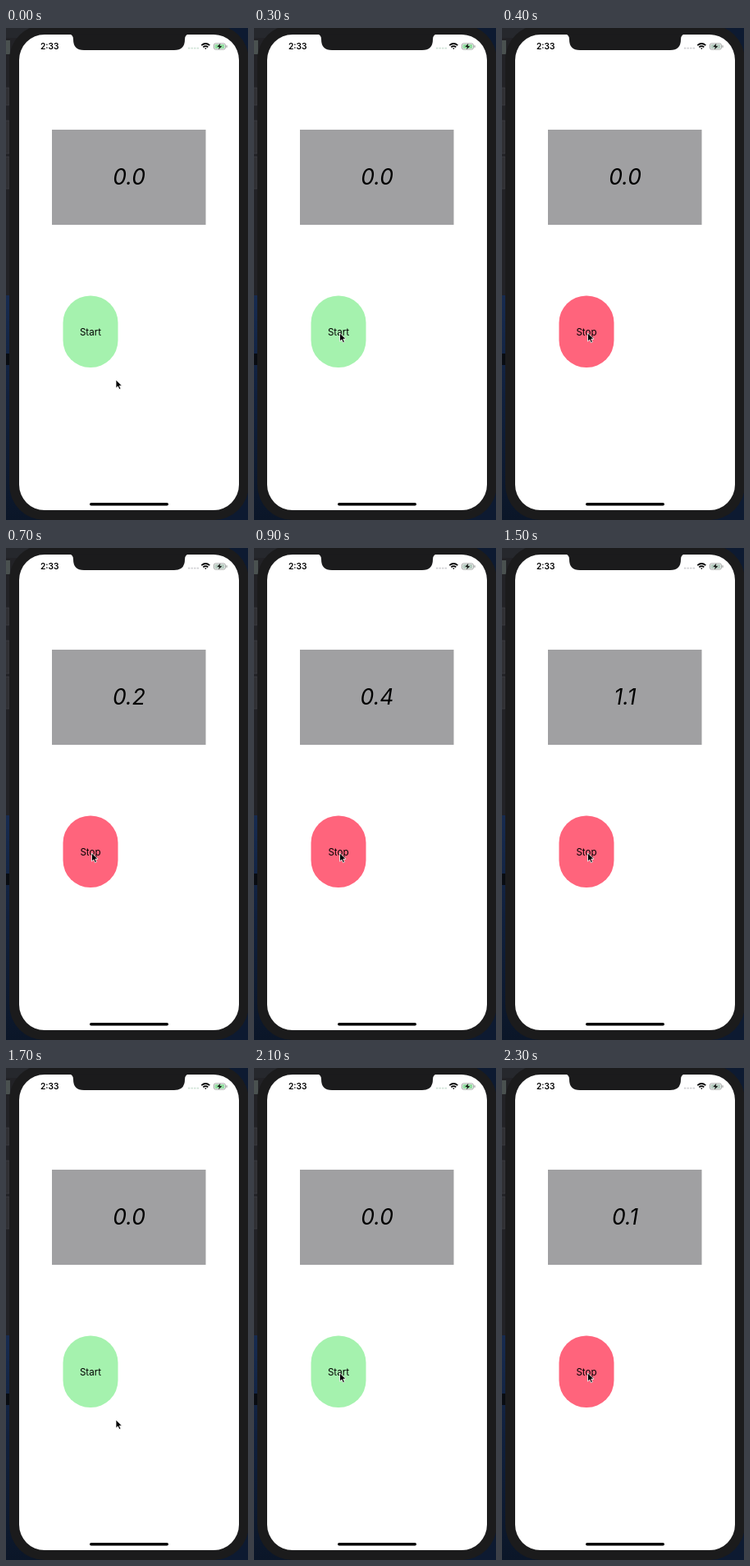
Write an HTML page that moves like this. It is 295x600 px and loops after 2400 ms.

```html
<!DOCTYPE html>
<html lang="en">
<head>
<meta charset="utf-8">
<title>Stopwatch</title>
<style>
  html, body { margin: 0; width: 100%; height: 100%; overflow: hidden; background: #171a22; }
  svg { display: block; width: 295px; height: 600px; font-family: Inter, "Open Sans", sans-serif; }
</style>
</head>
<body>
<svg viewBox="0 0 295 600">
  <defs>
    <linearGradient id="desk" x2="0" y2="1">
      <stop offset="0" stop-color="#172b50"/>
      <stop offset=".45" stop-color="#10203d"/>
      <stop offset="1" stop-color="#0b1628"/>
    </linearGradient>
  </defs>

  <!-- desktop behind the phone -->
  <rect width="295" height="600" fill="#0d1a31"/>
  <rect width="40" height="326" fill="#222226"/>
  <rect y="326" width="60" height="274" fill="url(#desk)"/>
  <rect width="40" height="12" fill="#26282d"/>
  <path d="M0 15h5v17h-5z" fill="#4a5150"/>
  <path d="M-1 73h5v21h-5zM-1 113h5v40h-5zM-1 157h5v39h-5z" fill="#303034" stroke="#414145" stroke-width=".7"/>
  <path d="M0 397h5v14h-5z" fill="#090c12"/>

  <!-- phone -->
  <rect x="4" y="-4" width="292" height="604" rx="43" fill="#1b1b1c"/>
  <rect x="16" y="8" width="268" height="580" rx="31" fill="#fff"/>
  <path d="M77 7.5q5 .5 5 6.500q0 13 13 13h110q13 0 13-13q0-6 5-6.500z" fill="#1b1b1c"/>
  <rect x="102" y="579" width="96" height="3.600" rx="1.800" fill="#000"/>

  <!-- status bar -->
  <text x="42" y="26.200" font-size="10.200" font-weight="600">2:33</text>
  <path id="dots" d="M222 24.700h13" stroke-width="1.800" stroke-dasharray="2.300 1.250"/>
  <g fill="none" stroke="#000" stroke-width="1.700">
    <path d="M238.300 21.200q5-4.400 10 0M240.300 23.300q3-2.500 6 0"/>
    <path d="M242 24.700q1.300-1 2.600 0l-1.300 1.400z" fill="#000" stroke="none"/>
  </g>
  <rect x="253.400" y="18.900" width="14" height="7.200" rx="2" fill="#fff" stroke="#8c908e" stroke-width=".8"/>
  <rect id="charge" x="254.500" y="20" width="11.800" height="5" rx="1"/>
  <path d="M269 21.200v2.600" stroke="#8c908e" stroke-width="1.100"/>
  <path d="M261.300 18.800l-4 4.200h2.600l-.7 3.300 4-4.300h-2.600z" fill="#111"/>

  <!-- app -->
  <rect x="56" y="124" width="187.500" height="116" fill="#a0a0a2"/>
  <text id="time" x="150" y="191.300" font-size="26.500" font-style="italic" text-anchor="middle"></text>
  <rect id="button" x="69.500" y="326.500" width="67" height="87.500" rx="33"/>
  <text id="label" x="103" y="374.500" font-size="11.600" text-anchor="middle"></text>
  <path id="cursor" d="M0 0v10.200l2.400-2.200 1.600 3.700 1.900-.8-1.600-3.600h3.200z" fill="#000" stroke="#fff" stroke-width=".8"/>
</svg>

<script>
const LOOP = 2400, STEP = 100, RUN = 1700;
const $ = id => document.getElementById(id);
const clamp = v => Math.min(1, Math.max(0, v));

function draw(ms) {
  const t = Math.floor(ms % LOOP / STEP) * STEP;
  // the second run begins slightly late; the first rests on its last step
  const u = t < RUN ? Math.min(t, 1500) : Math.max(0, t - RUN - 10);
  const running = u >= 395;
  const tenths = running ? Math.max(0, Math.floor((u - 420) / 97)) : 0;

  $("time").textContent = (tenths / 10).toFixed(1);
  $("label").textContent = running ? "Stop" : "Start";
  $("button").setAttribute("fill", running ? "#ff647c" : "#a5f2ae");
  $("charge").setAttribute("fill", running ? "#b5cbbf" : "#92dda0");
  $("dots").setAttribute("stroke", running ? "#d0d0d3" : "#cfe3d5");

  const p = clamp(u / 300), k = p * p * (3 - 2 * p);
  $("cursor").setAttribute("transform", `translate(${134 - 29.500 * k} ${429 - 57 * k})`);
}

const start = performance.now();
function frame() {
  draw(performance.now() - start);
  requestAnimationFrame(frame);
}
frame();
</script>
</body>
</html>
```
